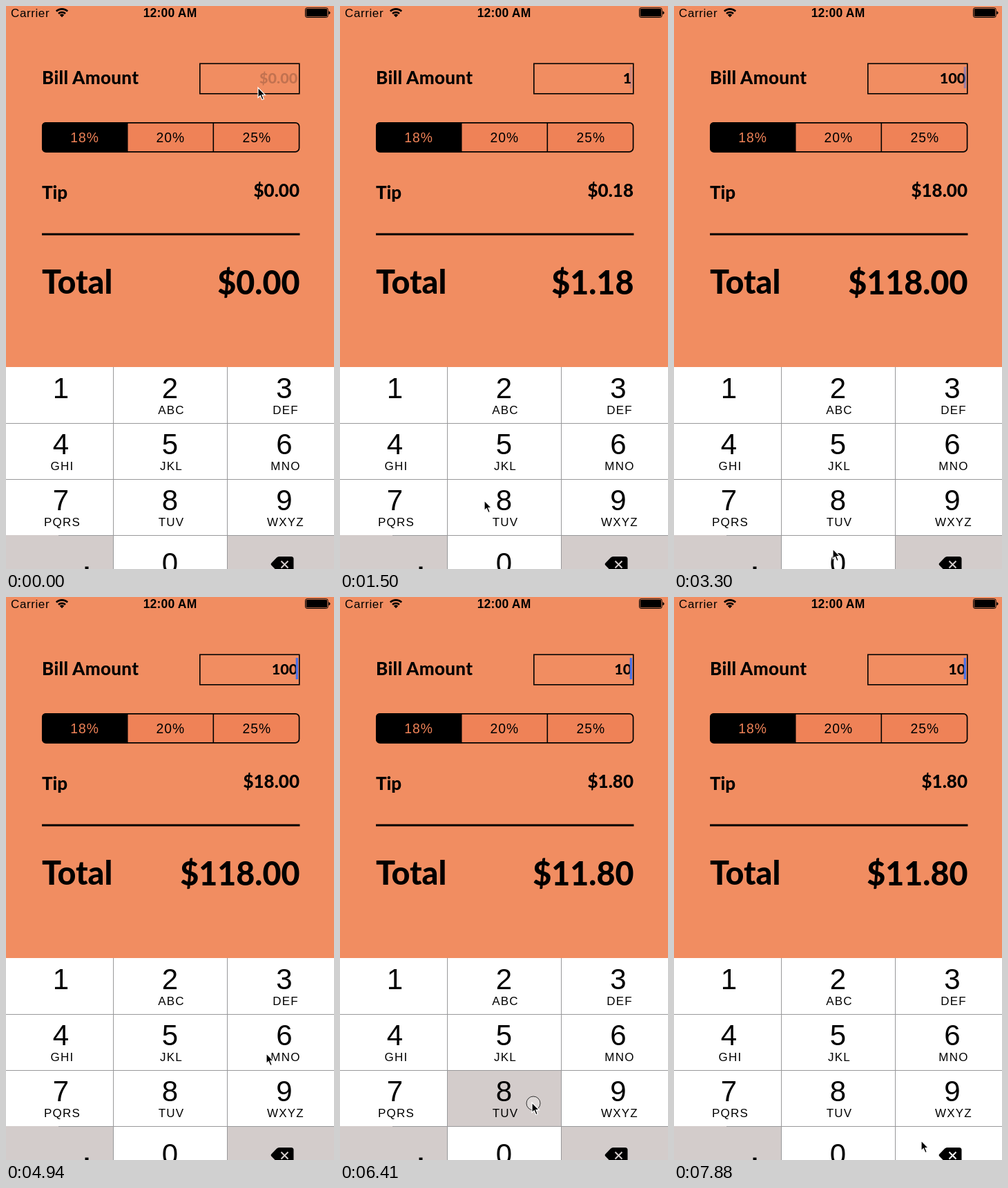
An HTML page that plays this animation: 475x814 px, repeating every 8 s.

```html
<!DOCTYPE html>
<html lang="en">
<head>
<meta charset="utf-8">
<title>Tip calculator</title>
<style>
  html, body { margin: 0; width: 100%; height: 100%; overflow: hidden; background: #f18d61; }
  svg { display: block; width: 475px; height: 814px; }
  text { font-family: "Liberation Sans", Arial, sans-serif; white-space: pre; }
  .b { font-family: Lato, "Open Sans", sans-serif; font-weight: 800; font-size: 26px; }
  .big { font-size: 46.6px; }
  .field { font-size: 21.6px; }
  .end { text-anchor: end; }
  .seg { font-size: 19.3px; letter-spacing: 1px; text-anchor: middle; }
  .digit { font-size: 42px; text-anchor: middle; }
  .abc { font-size: 17px; letter-spacing: 1.2px; text-anchor: middle; }
</style>
</head>
<body>
<svg viewBox="0 0 475 814">
  <rect width="475" height="814" fill="#f18d61"/>

  <!-- status bar -->
  <text x="7" y="16" font-size="17" letter-spacing=".6">Carrier</text>
  <g fill="none" stroke="#000" stroke-width="2.6">
    <path d="M72.8 7.6A12 12 0 0 1 89.2 7.6M76 11A7.4 7.4 0 0 1 86 11"/>
  </g>
  <path d="M81 16.2L77.8 12.9A4.6 4.6 0 0 1 84.2 12.9Z"/>
  <text x="237.6" y="15.7" font-size="17.5" letter-spacing=".2" font-weight="700" text-anchor="middle">12:00 AM</text>
  <rect x="433.5" y="2.7" width="32.7" height="13.8" rx="2.5" fill="none" stroke="#000"/>
  <rect x="434.7" y="4" width="30.3" height="11.2" rx="1.3"/>
  <path d="M467.3 7.3Q469.6 7.8 469.6 9.8T467.3 12.3Z"/>

  <!-- form -->
  <text class="b" x="52" y="113" letter-spacing=".35">Bill Amount</text>
  <rect x="280.8" y="83.3" width="144" height="43.5" fill="none" stroke="#000" stroke-width="1.6"/>
  <text id="bill" class="b field end" x="422.3" y="111.5"></text>
  <rect id="caret" x="419.7" y="88" width="3.3" height="31" fill="#4a70e6"/>

  <rect x="52.8" y="168.8" width="371.8" height="42" rx="5.5" fill="#ef8257" stroke="#000" stroke-width="1.7"/>
  <path d="M176.5 168V211.6H58Q52 211.6 52 205.6V174Q52 168 58 168Z"/>
  <path d="M300.3 168V211" stroke="#000" stroke-width="1.6"/>
  <text class="seg" x="114" y="197" fill="#ef8257">18%</text>
  <text class="seg" x="238.3" y="197">20%</text>
  <text class="seg" x="363.3" y="197">25%</text>

  <text class="b" x="52" y="278.5">Tip</text>
  <text id="tip" class="b end" x="425" y="276"></text>
  <path d="M52 330H425.5" stroke="#000" stroke-width="3"/>
  <text class="b big" x="52" y="416">Total</text>
  <text id="total" class="b big end" x="425.5" y="416.5"></text>

  <!-- keypad -->
  <rect y="522" width="475" height="292" fill="#fff"/>
  <rect y="765" width="155" height="49" fill="#d3cccb"/>
  <rect id="delKey" x="321" y="766" width="154" height="48"/>
  <rect id="lit" width="165" height="81" fill="#d3cccb"/>
  <path d="M155.5 522V814M320.5 522V814M0 603.5H475M0 684.5H475M76 765.5H475" stroke="#98989a"/>
  <g id="keys"></g>
  <rect x="114.5" y="810.5" width="5" height="4"/>
  <path d="M384.3 805.6L392 797.5Q393.5 796 395.5 796H413Q416.5 796 416.5 799.5V815Q416.5 818 413 818H395.5Q393.5 818 392 816.5L384.3 808.4Q383 807 384.3 805.6Z"/>
  <path id="cross" d="M398.5 802.5L408.5 812.5M408.5 802.5L398.5 812.5" stroke-width="2"/>

  <!-- pointer -->
  <g id="pointer">
    <circle id="ring" cx="2" cy="1" r="10" fill="#fff" fill-opacity=".25" stroke="#333"/>
    <path d="M0 0V14.5L3.3 11.5L5.8 17.5L8.3 16.5L5.9 10.7H10.4Z" stroke="#fff" stroke-width="1.2"/>
  </g>
</svg>
<script>
const $ = id => document.getElementById(id);
const LOOP = 8000, STEP = 148.6;      // the picture advances in discrete steps
const GREY = '#d3cccb';

const colX = [79.5, 237.5, 403], rowY = [566.5, 647.5, 728.5, 819.5];
const letters = ['', 'ABC', 'DEF', 'GHI', 'JKL', 'MNO', 'PQRS', 'TUV', 'WXYZ'];
$('keys').innerHTML = letters.map((abc, i) => {
  const x = colX[i % 3], y = rowY[i / 3 | 0];
  return `<text class="digit" x="${x}" y="${y}">${i + 1}</text>` +
         `<text class="abc" x="${x + 2}" y="${y + 23}">${abc}</text>`;
}).join('') + `<text class="digit" x="${colX[1]}" y="${rowY[3]}">0</text>`;

// [step, value]
const bills = [[0, ''], [6, '1'], [16, '10'], [19, '100'], [41, '10'], [44, '108'], [53, '10']];
// [step, key left, key top]
const presses = [[5, -10, 522], [15, 155, 766], [18, 155, 766], [43, 155, 685]];
const deletes = [40, 52];
// [step, x, y]
const path = [
  [0, 365, 118], [1, 365, 118], [2, 290, 250], [3, 74, 563], [6, 74, 563],
  [10, 209, 715], [11, 221, 733], [13, 229, 785], [21, 229, 785], [22, 230, 785],
  [26, 219, 600], [27, 219, 600], [33, 377, 660], [34, 377, 660], [39, 358, 786],
  [41, 358, 786], [42, 278, 731], [45, 278, 731], [50, 358, 786], [54, 358, 786]
];
const blink = [1, 1, 1, .5, .2, 0, .6];

function pointerAt(n) {
  const i = path.findIndex(p => p[0] > n);
  const [a, x0, y0] = path[i - 1], [b, x1, y1] = path[i];
  const k = (n - a) / (b - a);
  return [x0 + (x1 - x0) * k, y0 + (y1 - y0) * k];
}

const money = v => '$' + v.toFixed(2);

function draw(t) {
  const n = Math.floor(t / STEP);
  const [typedAt, bill] = bills.filter(b => b[0] <= n).pop();
  const amount = Number(bill);

  $('bill').textContent = bill || '$0.00';
  $('bill').setAttribute('fill', bill ? '#000' : '#c27250');
  $('tip').textContent = money(amount * .18);
  $('total').textContent = money(amount * 1.18);
  $('caret').setAttribute('opacity', n < 2 ? 0 : blink[(n - (typedAt || 2)) % 7]);

  const press = presses.find(p => p[0] === n);
  $('lit').setAttribute('opacity', press ? 1 : 0);
  if (press) {
    $('lit').setAttribute('x', press[1]);
    $('lit').setAttribute('y', press[2]);
  }
  const deleting = deletes.some(d => n === d || n === d + 1);
  $('delKey').setAttribute('fill', deleting ? '#fff' : GREY);
  $('cross').setAttribute('stroke', deleting ? '#fff' : GREY);

  $('ring').setAttribute('opacity', press || deletes.includes(n) ? 1 : 0);
  $('pointer').setAttribute('transform', `translate(${pointerAt(n)})`);
}

const start = performance.now();
function frame() {
  draw((performance.now() - start) % LOOP);
  requestAnimationFrame(frame);
}
frame();
</script>
</body>
</html>
```
